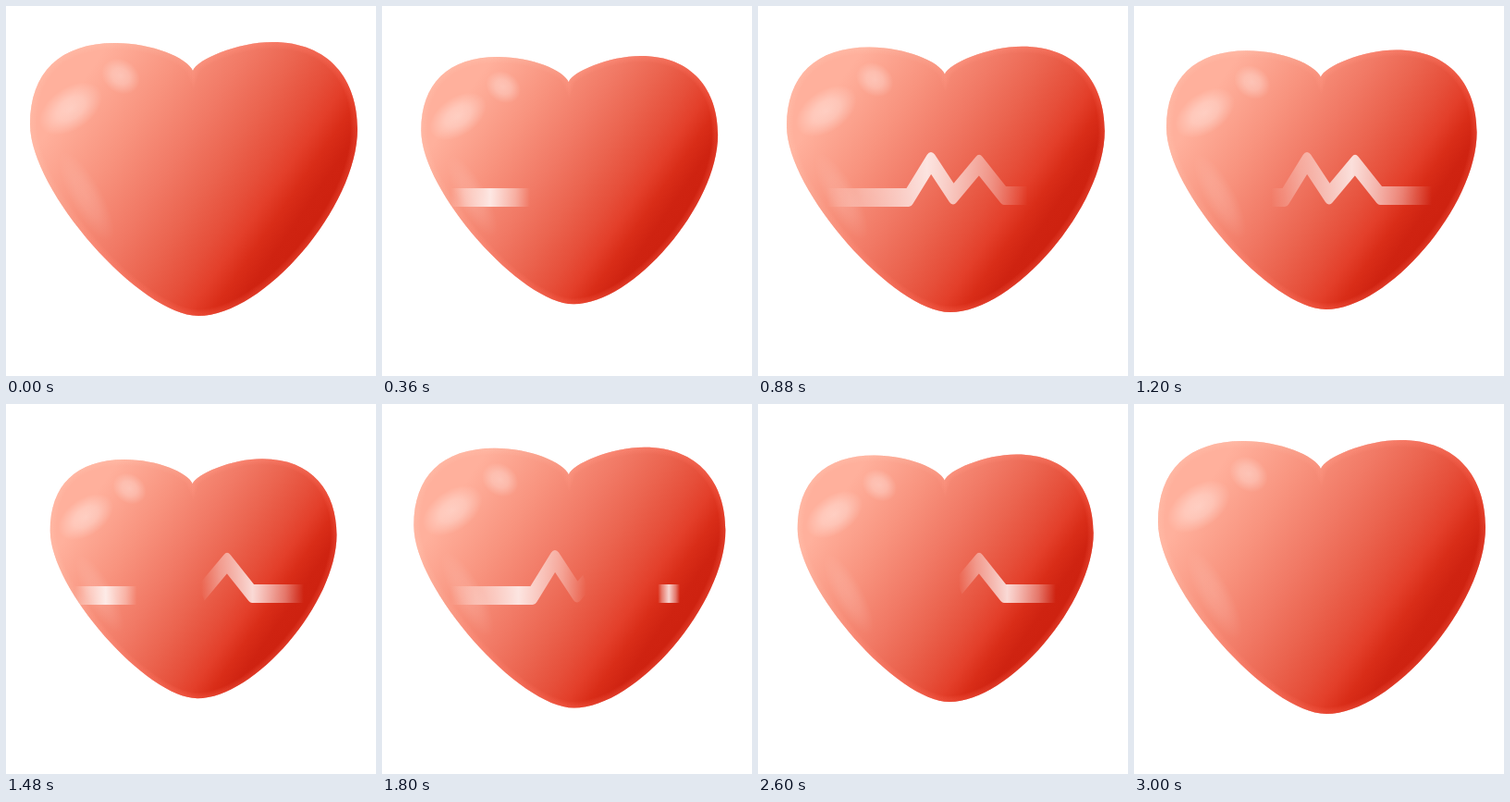
These frames come from a looping animation (400 px wide and 400 px high, 3040 ms). An HTML page with a canvas:

```html
<!DOCTYPE html>
<html lang="en">
<head>
<meta charset="utf-8">
<title>Heartbeat</title>
<style>
html, body { margin: 0; width: 100%; height: 100%; overflow: hidden; background: #fff; }
canvas { display: block; width: 400px; height: 400px; }
</style>
</head>
<body>
<canvas id="stage" width="400" height="400"></canvas>
<script>
const ctx = document.getElementById('stage').getContext('2d');
const LOOP = 3040, STEP = 40;

const heart = new Path2D(
  'M202 70 C206 58 250 39 288 39 C350 39 380 80 380 133 C380 217 279 335 208 335 ' +
  'C146 335 26 200 26 128 C26 72 58 40 118 40 C158 40 196 56 202 70 Z');

const pulse = [[74, 207], [163, 207], [187, 168], [211, 204.5], [239, 171], [266, 205], [322, 205]];
const marks = [0];
for (let i = 1; i < pulse.length; i++) {
  marks.push(marks[i - 1] + Math.hypot(pulse[i][0] - pulse[i - 1][0], pulse[i][1] - pulse[i - 1][1]));
}
const total = marks[marks.length - 1];
const PEN = 0.6; // the pen is narrower across than it is tall

// Each line is drawn in, then wiped out from its start.
const lines = [
  { inAt: 142, inEnd: 957, outAt: 1000, outEnd: 1864 },
  { inAt: 1309, inEnd: 2124, outAt: 2095, outEnd: 2960 }
];

const ramp = (t, a, b) => Math.min(1, Math.max(0, (t - a) / (b - a)));

function beat(t) {
  const p = t % 1000;
  return p < 480 ? 1 - 0.125 * p / 480 : 0.875 + 0.125 * (p - 480) / 520;
}

function addStops(g, stops) {
  for (const [pos, color] of stops) g.addColorStop(pos, color);
  return g;
}

const skin = addStops(ctx.createLinearGradient(70, 100, 310, 265), [
  [0, '#ffb09c'], [0.25, '#f8937e'], [0.45, '#f17965'], [0.6, '#eb644f'],
  [0.73, '#e64f3a'], [0.81, '#e33f2a'], [0.88, '#d92d18'], [0.95, '#cf2311'], [1, '#ce2210']
]);

const rim = addStops(ctx.createLinearGradient(70, 100, 310, 265), [
  [0, 'rgba(255,190,170,.09)'], [0.6, 'rgba(255,120,100,.09)'], [1, 'rgba(245,85,65,.07)']
]);

function glow(x, y, rx, ry, turn, alpha) {
  ctx.save();
  ctx.translate(x, y);
  ctx.rotate(turn);
  ctx.scale(rx, ry);
  ctx.fillStyle = addStops(ctx.createRadialGradient(0, 0, 0, 0, 0, 1), [
    [0, `rgba(255,255,255,${alpha})`],
    [0.45, `rgba(255,255,255,${alpha * 0.76})`],
    [1, 'rgba(255,255,255,0)']
  ]);
  ctx.beginPath();
  ctx.arc(0, 0, 1, 0, Math.PI * 2);
  ctx.fill();
  ctx.restore();
}

function drawHeart(scale) {
  ctx.save();
  ctx.translate(200, 200);
  ctx.scale(scale, scale);
  ctx.translate(-200, -200);
  ctx.fillStyle = skin;
  ctx.fill(heart);
  ctx.clip(heart);
  ctx.strokeStyle = rim;
  for (let w = 2; w <= 14; w += 2) {
    ctx.lineWidth = w;
    ctx.stroke(heart);
  }
  glow(70, 111, 38, 23, -0.6, 0.4);
  glow(124, 76, 22, 18, 0.6, 0.35);
  glow(87, 206, 54, 17, 1.07, 0.13);
  ctx.restore();
}

function pointAt(d) {
  let i = 1;
  while (i < marks.length - 1 && marks[i] < d) i++;
  const k = (d - marks[i - 1]) / (marks[i] - marks[i - 1]);
  return pulse[i].map((v, n) => pulse[i - 1][n] + (v - pulse[i - 1][n]) * k);
}

function drawLine(from, to) {
  if (to - from < 1) return;
  const a = pointAt(from), b = pointAt(to);
  ctx.save();
  ctx.beginPath();
  ctx.moveTo(...a);
  pulse.forEach((p, i) => {
    if (marks[i] > from && marks[i] < to) ctx.lineTo(...p);
  });
  ctx.lineTo(...b);
  ctx.scale(PEN, 1);
  ctx.strokeStyle = addStops(ctx.createLinearGradient(a[0] / PEN, 0, b[0] / PEN, 0), [
    [0, 'rgba(255,255,255,0)'], [0.18, 'rgba(255,255,255,.36)'],
    [0.5, 'rgba(255,255,255,.8)'],
    [0.82, 'rgba(255,255,255,.36)'], [1, 'rgba(255,255,255,0)']
  ]);
  ctx.lineWidth = 20;
  ctx.lineJoin = 'round';
  ctx.lineCap = 'butt';
  ctx.stroke();
  ctx.restore();
}

function render(now) {
  const t = Math.floor((now % LOOP) / STEP) * STEP;
  ctx.fillStyle = '#fff';
  ctx.fillRect(0, 0, 400, 400);
  drawHeart(beat(t));
  for (const l of lines) {
    drawLine(total * ramp(t, l.outAt, l.outEnd), total * ramp(t, l.inAt, l.inEnd));
  }
}

const start = performance.now();
function tick() {
  render(performance.now() - start);
  requestAnimationFrame(tick);
}
tick();
</script>
</body>
</html>
```
